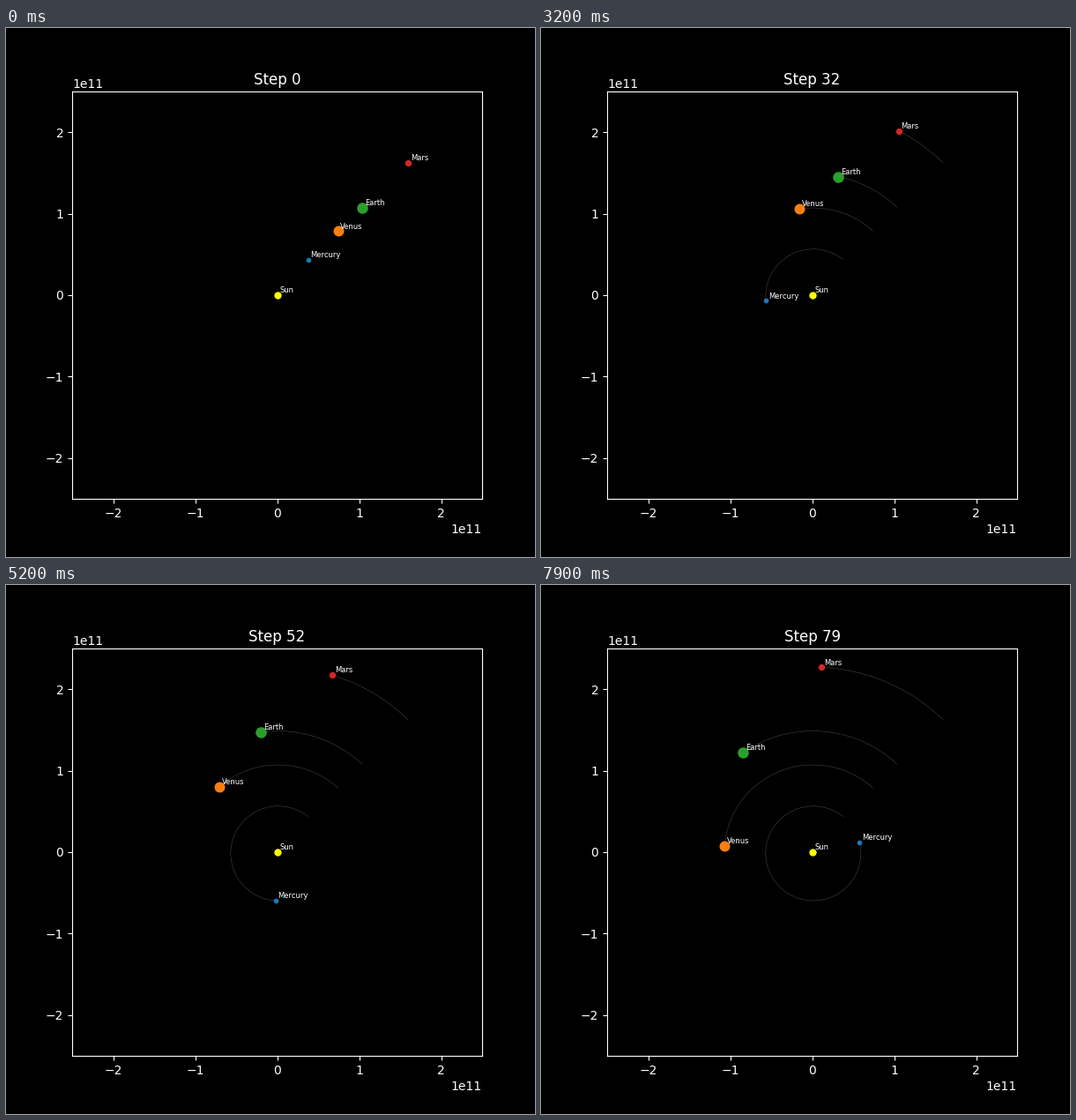
These frames come from a looping animation (600 px wide and 600 px high, 8 s). A matplotlib script:

```python
import numpy as np
import matplotlib.pyplot as plt
from matplotlib.animation import FuncAnimation

STEPS = 80
DAY = 86400.0
GM = 6.6743e-11 * 1.989e30

# name, orbit radius (m), size relative to Earth, colour
PLANETS = [
    ("Mercury", 5.79e10, 0.383, "tab:blue"),
    ("Venus", 1.082e11, 0.949, "tab:orange"),
    ("Earth", 1.496e11, 1.0, "tab:green"),
    ("Mars", 2.279e11, 0.532, "tab:red"),
]


def orbit(radius):
    """Semi-implicit Euler path, one point per day, starting at 45 degrees."""
    pos = radius * np.array([1.0, 1.0]) / np.sqrt(2)
    vel = np.sqrt(GM / radius) * np.array([-1.0, 1.0]) / np.sqrt(2)
    path = []
    for _ in range(STEPS):
        vel = vel - GM * pos / np.hypot(*pos) ** 3 * DAY
        pos = pos + vel * DAY
        path.append(pos)
    return np.array(path)


fig, ax = plt.subplots(figsize=(6, 6), dpi=100, facecolor="black")
ax.set_facecolor("black")
ax.set_xlim(-2.5e11, 2.5e11)
ax.set_ylim(-2.5e11, 2.5e11)
ax.tick_params(colors="white")
for spine in ax.spines.values():
    spine.set_color("white")
for axis in (ax.xaxis, ax.yaxis):
    axis.get_offset_text().set_color("white")
title = ax.set_title("Step 0", color="white")


def add_body(name, size, color, pos=(0, 0)):
    dot, = ax.plot(*[[p] for p in pos], "o", ms=size, color=color, zorder=3)
    label = ax.annotate(name, pos, xytext=(2, 2), textcoords="offset points",
                        color="white", fontsize=6, zorder=4)
    return dot, label


add_body("Sun", 5, "yellow")
bodies = []
for name, radius, size, color in PLANETS:
    path = orbit(radius)
    trail, = ax.plot([], [], color="white", lw=0.1, zorder=2)
    bodies.append((path, trail, *add_body(name, 8 * size, color, path[0])))


def draw(step):
    title.set_text(f"Step {step}")
    for path, trail, dot, label in bodies:
        trail.set_data(*path[:step + 1].T)
        dot.set_data(*path[step:step + 1].T)
        label.xy = path[step]
    return []


anim = FuncAnimation(fig, draw, frames=STEPS, interval=100,
                     repeat=True, repeat_delay=0, blit=False)
plt.show()
```
